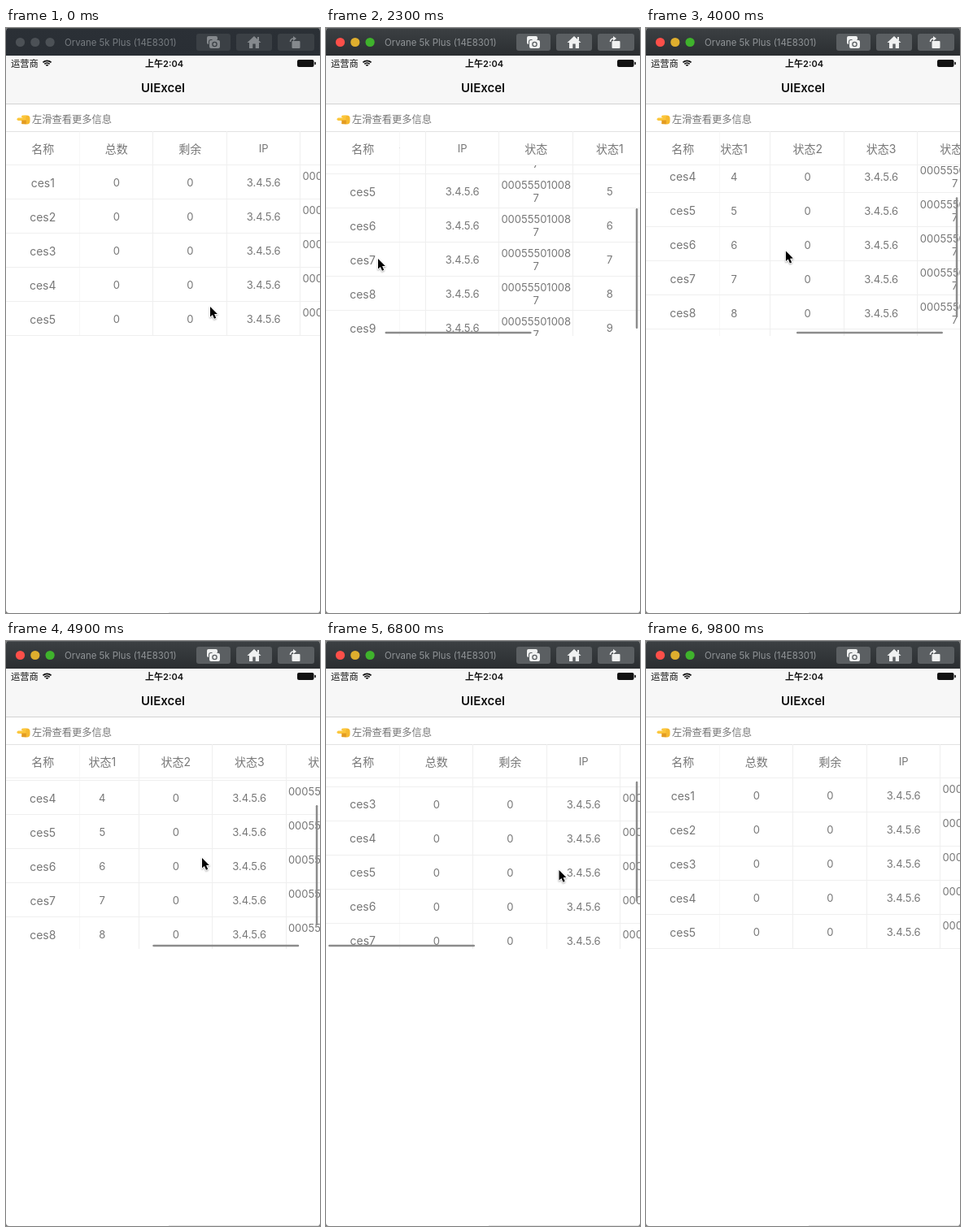
An HTML page with a canvas for the animation above (9.9 s loop, 386x720 px).

```html
<!DOCTYPE html>
<html lang="zh">
<head>
<meta charset="utf-8">
<style>
html, body { margin: 0; height: 100%; overflow: hidden; background: #fff; }
canvas { display: block; width: 386px; height: 720px; }
</style>
</head>
<body>
<canvas id="stage"></canvas>
<script>
const W = 386, H = 720, LOOP = 9900, STEP = 100;
const COL = 90.5, ROW = 42, HEAD = 127, BODY = 169, END = 379;
const SANS = 'Inter, "Noto Sans CJK SC", "Noto Sans CJK", sans-serif';
const GREY = '#777';
const PHONE = ['00055501008', '7'];
const TITLES = ['名称', '总数', '剩余', 'IP', '状态', '状态1', '状态2', '状态3', '状态4'];

// [time, x, y]
const SCROLL = [[700, 0, 0], [1600, 20, 110], [2300, 149, 157], [2800, 370, 150], [3200, 398, 142.5],
  [4900, 379.5, 123], [5900, 130.5, 106.5], [6700, 0, 75], [7700, 0, 9], [8100, 0, 0]];
const POINTER = [[0, 251, 343], [300, 250, 345], [700, 250, 345], [1500, 190, 310], [2300, 64, 284],
  [3200, 114, 281], [4900, 241, 267], [5900, 240, 268], [7700, 333, 296], [8300, 392, 296]];

const canvas = document.getElementById('stage');
const c = canvas.getContext('2d');
const dpr = window.devicePixelRatio || 1;
canvas.width = W * dpr;
canvas.height = H * dpr;

const clamp = v => Math.max(0, Math.min(1, v));

function track(keys, t) {
  const next = keys.findIndex(k => k[0] > t);
  if (next === 0) return keys[0].slice(1);
  if (next < 0) return keys[keys.length - 1].slice(1);
  const a = keys[next - 1], b = keys[next];
  const u = (t - a[0]) / (b[0] - a[0]), e = u * u * (3 - 2 * u);
  return [a[1] + (b[1] - a[1]) * e, a[2] + (b[2] - a[2]) * e];
}

function rect(x, y, w, h, fill) {
  c.fillStyle = fill;
  c.fillRect(x, y, w, h);
}

function pill(x, y, w, h, r, fill) {
  c.fillStyle = fill;
  c.beginPath();
  c.roundRect(x, y, w, h, r);
  c.fill();
}

function disc(x, y, r, fill) {
  pill(x - r, y - r, 2 * r, 2 * r, r, fill);
}

function shape(points, fill) {
  c.fillStyle = fill;
  c.beginPath();
  points.forEach(p => c.lineTo(...p));
  c.closePath();
  c.fill();
}

function arc(x, y, r, from, to, width, color) {
  c.strokeStyle = color;
  c.lineWidth = width;
  c.beginPath();
  c.arc(x, y, r, from * Math.PI, to * Math.PI);
  c.stroke();
}

function text(s, x, y, size, color = GREY, align = 'center', weight = 400) {
  c.font = `${weight} ${size}px ${SANS}`;
  c.fillStyle = color;
  c.textAlign = align;
  c.textBaseline = 'alphabetic';
  c.fillText(s, x, y + size * 0.365);
}

function clipped(x, y, w, h, draw) {
  c.save();
  c.beginPath();
  c.rect(x, y, w, h);
  c.clip();
  draw();
  c.restore();
}

function titleBar(active) {
  const shade = c.createLinearGradient(0, 0, 0, 34);
  shade.addColorStop(0, active ? '#3c4043' : '#2b3036');
  shade.addColorStop(1, active ? '#2b2e31' : '#292e34');
  rect(0, 0, W, 34, shade);
  rect(0, 0, W, 1, active ? '#55595b' : '#44494a');
  const lights = active ? ['#fc4f49', '#dfae2e', '#3fb22c'] : ['#4c5156', '#4c5156', '#4c5156'];
  lights.forEach((color, i) => disc(17.5 + i * 18.3, 17.5, 5.6, color));
  text('Orvane 5k Plus (14E8301)', 72, 17.5, 11.4, active ? '#909497' : '#777c81', 'left');

  const face = active ? '#5b5f62' : '#3b4045', icon = active ? '#f0f1f1' : '#85898d';
  [[234, 42], [283, 44], [334, 45]].forEach(([x, w]) => pill(x, 7, w, 21, 3, face));

  pill(247, 10, 13, 10, 2, icon);
  pill(249, 14, 15, 12, 3, face);
  pill(250, 15, 13, 10, 2, icon);
  pill(253.5, 13, 6, 4, 1, icon);
  arc(256.5, 20, 2.6, 0, 2, 1.3, face);

  shape([[305, 10], [313.5, 18], [311, 18], [311, 25], [299, 25], [299, 18], [296.5, 18]], icon);
  rect(309, 11, 2, 4, icon);
  rect(303.3, 19.5, 3.4, 5.5, face);

  pill(351.5, 16, 10, 9, 1, icon);
  arc(353.5, 17, 4, 1, 1.55, 1.6, icon);
  shape([[353, 10], [357, 13], [353, 16]], icon);
}

function phoneBars() {
  rect(0, 34, W, 60, '#f7f7f7');
  rect(0, 93, W, 1, '#d2d2d2');
  text('运营商', 6, 43.5, 11.3, '#111', 'left');
  [1.8, 4.5, 7.2].forEach(r => arc(50.5, 47.5, r, 1.25, 1.75, 1.7, '#111'));
  text('上午2:04', 194.5, 43.5, 11, '#111', 'center', 600);
  pill(358, 39, 20.5, 9, 2, '#111');
  pill(379.3, 41.8, 1.6, 3.4, 0.8, '#111');
  text('UIExcel', 193, 73.5, 15, '#111', 'center', 600);
}

function hint() {
  pill(20.5, 107.5, 9, 11, 4, '#f6b92f');
  pill(13.5, 110.5, 11, 3.4, 1.7, '#fcc73c');
  pill(19, 107.5, 6, 3, 1.5, '#fcc73c');
  [113.5, 115.8].forEach(y => pill(19, y, 6, 2.5, 1.2, '#e39b22'));
  text('左滑查看更多信息', 32, 113, 12.25, GREY, 'left');
}

function cell(col, row, x, y) {
  const number = String(row + 1);
  if (col === 0) return text('ces' + number, x, y, 14);
  if (col === 4 || col === 8) return PHONE.forEach((s, i) => text(s, x, y - 8 + 16 * i, 13));
  text(col === 5 ? number : col === 3 || col === 7 ? '3.4.5.6' : '0', x, y, 13);
}

function columns(first, last, sx, sy) {
  for (let i = first; i <= last; i++) {
    const left = i * COL - sx;
    if (left > W || left + COL < 0) continue;
    const mid = left + COL / 2;
    text(TITLES[i], mid, 148.5, i === 3 ? 13 : 14);
    rect(Math.round(left + COL) - 1, HEAD, 1, END - HEAD, '#efefef');
    clipped(left, BODY, COL, END - BODY, () => {
      for (let r = 0; r < 9; r++) cell(i, r, mid, BODY + ROW * (r + 0.5) - sy + 0.5);
    });
  }
}

function table(sx, sy) {
  rect(0, HEAD, W, 1, '#e2e2e2');
  clipped(COL, HEAD, W - COL, END - HEAD + 1, () => columns(1, 8, sx, sy));
  clipped(0, HEAD, COL, END - HEAD + 1, () => columns(0, 0, 0, sy));
  rect(0, BODY - 1, W, 1, '#f0f0f0');
  clipped(0, BODY, W, END - BODY, () => {
    for (let r = 1; r <= 9; r++) rect(0, Math.round(BODY + r * ROW - sy) - 1, W, 1, '#efefef');
  });
}

function scrollBars(sx, sy, alpha) {
  c.globalAlpha = alpha;
  pill(3 + sx * 0.467, 373.8, 180, 2.5, 1.25, '#8c8c8c');
  pill(380.8, 130 + sy * 0.586, 2.5, 148, 1.25, '#8c8c8c');
  c.globalAlpha = 1;
}

function pointer(x, y) {
  c.save();
  c.translate(x, y);
  c.beginPath();
  [[0, 0], [0, 12.5], [2.9, 9.9], [5, 14.8], [7.2, 13.8], [5.1, 9.1], [8.9, 9]].forEach(p => c.lineTo(...p));
  c.closePath();
  c.lineJoin = 'round';
  c.lineWidth = 1.8;
  c.strokeStyle = '#fff';
  c.shadowColor = 'rgba(0,0,0,.35)';
  c.shadowBlur = 2;
  c.shadowOffsetY = 1;
  c.stroke();
  c.shadowColor = 'transparent';
  c.fillStyle = '#000';
  c.fill();
  c.restore();
}

function draw(t) {
  const [sx, sy] = track(SCROLL, t);
  c.setTransform(dpr, 0, 0, dpr, 0, 0);
  rect(0, 0, W, H, '#777');
  c.save();
  c.beginPath();
  c.roundRect(0, 0, W, H, 4);
  c.clip();
  rect(0, 0, W, H, '#fff');
  titleBar(t >= 500);
  phoneBars();
  hint();
  table(sx, sy);
  scrollBars(sx, sy, Math.min(clamp((t - 600) / 200), clamp((8700 - t) / 300)));
  rect(200, H - 1, W - 200, 1, '#e6e6e6');
  if (t < 8300) pointer(...track(POINTER, t));
  c.restore();
}

function tick() {
  draw(Math.floor(performance.now() % LOOP / STEP) * STEP);
  requestAnimationFrame(tick);
}
tick();
</script>
</body>
</html>
```
